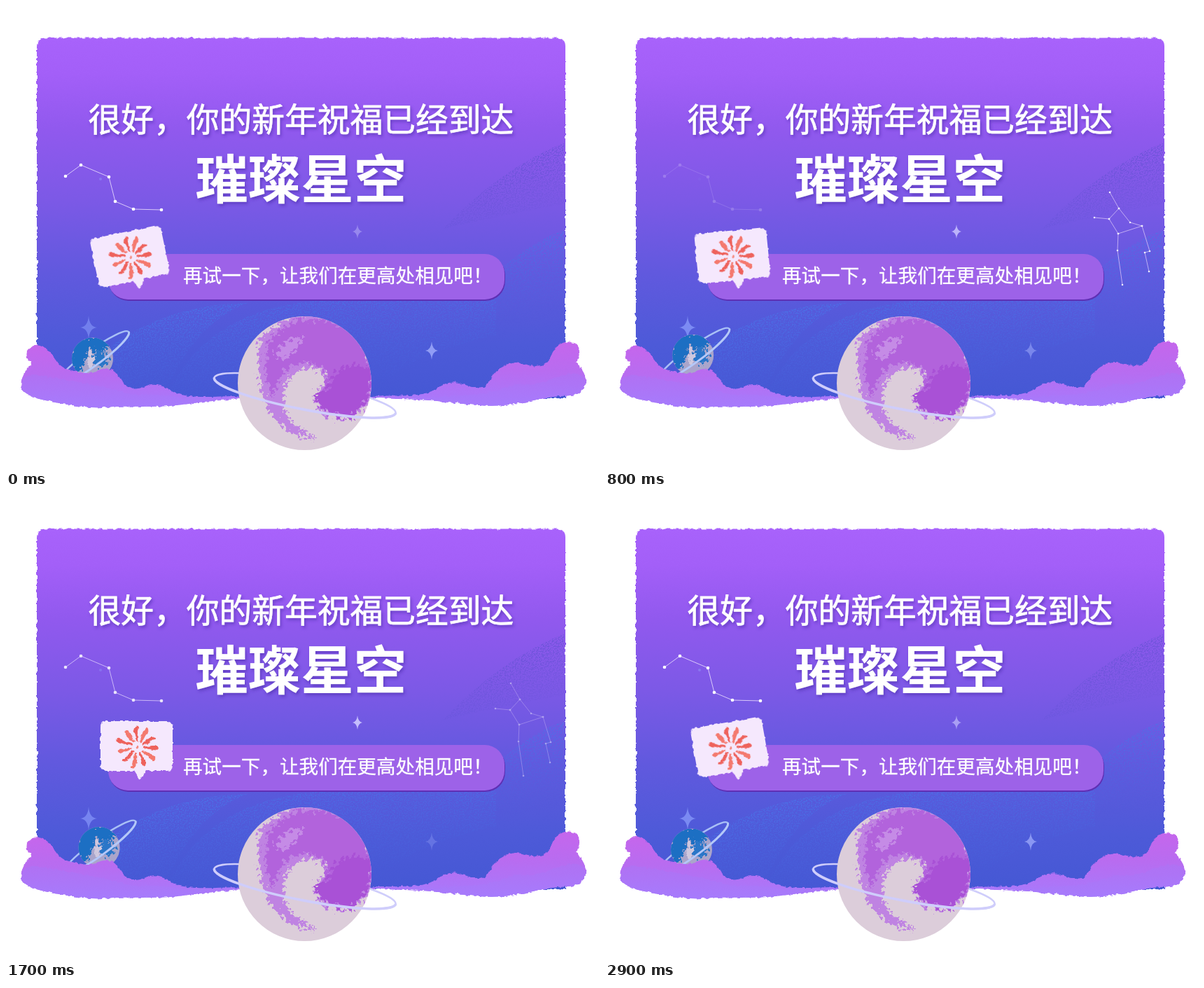
Animation, 847 px wide and 661 px high, one loop 3 s. Source, as an HTML page:

```html
<!DOCTYPE html>
<html lang="zh-CN">
<head>
<meta charset="utf-8">
<style>
html, body { margin: 0; width: 100%; height: 100%; overflow: hidden; background: #fff; }
svg { display: block; width: 100vw; height: 100vh; }
text { font-family: "Noto Sans CJK SC", "Noto Sans CJK JP", "Noto Sans CJK", sans-serif; fill: #fff; }
</style>
</head>
<body>
<svg viewBox="0 0 847 661" xmlns="http://www.w3.org/2000/svg">
  <defs>
    <linearGradient id="sky" x2="0" y2="1">
      <stop offset="0" stop-color="#a862fb"/>
      <stop offset=".1" stop-color="#a35ff8"/>
      <stop offset=".25" stop-color="#9159ee"/>
      <stop offset=".45" stop-color="#7c59e6"/>
      <stop offset=".65" stop-color="#6159de"/>
      <stop offset=".85" stop-color="#4d5ad8"/>
      <stop offset="1" stop-color="#4558d4"/>
    </linearGradient>
    <linearGradient id="cloud" x2="0" y2="1">
      <stop offset="0" stop-color="#c566ec"/>
      <stop offset=".45" stop-color="#b86cf0"/>
      <stop offset="1" stop-color="#a67afc"/>
    </linearGradient>
    <linearGradient id="mist" x2="0" y2="1">
      <stop offset="0" stop-color="#b071f3"/>
      <stop offset="1" stop-color="#a67bfc"/>
    </linearGradient>
    <linearGradient id="bandHigh" x1=".3" y1="0" x2=".7" y2="1">
      <stop offset="0" stop-color="#5a50cc" stop-opacity=".75"/>
      <stop offset="1" stop-color="#5a50cc" stop-opacity="0"/>
    </linearGradient>
    <linearGradient id="bandLow" x1=".35" y1="0" x2=".6" y2="1">
      <stop offset="0" stop-color="#4a76ea" stop-opacity=".85"/>
      <stop offset="1" stop-color="#4a66e0" stop-opacity="0"/>
    </linearGradient>
    <filter id="rough" x="-5%" y="-5%" width="110%" height="110%" color-interpolation-filters="sRGB">
      <feTurbulence type="fractalNoise" baseFrequency=".16" numOctaves="2" seed="4"/>
      <feDisplacementMap in="SourceGraphic" scale="5" xChannelSelector="R" yChannelSelector="G"/>
    </filter>
    <filter id="brush" x="-20%" y="-20%" width="140%" height="140%" color-interpolation-filters="sRGB">
      <feTurbulence type="fractalNoise" baseFrequency=".18" numOctaves="3" seed="9"/>
      <feDisplacementMap in="SourceGraphic" scale="24" xChannelSelector="R" yChannelSelector="G"/>
      <feGaussianBlur stdDeviation=".6"/>
    </filter>
    <filter id="spray" color-interpolation-filters="sRGB">
      <feTurbulence type="fractalNoise" baseFrequency=".55" numOctaves="2" seed="2"/>
      <feColorMatrix values="0 0 0 0 0  0 0 0 0 0  0 0 0 0 0  7 0 0 0 -3.3"/>
      <feComposite in="SourceGraphic" operator="in"/>
    </filter>
    <filter id="shade" x="-5%" y="-20%" width="110%" height="150%">
      <feDropShadow dx="2" dy="3" stdDeviation="2" flood-color="#4a2aa8" flood-opacity=".55"/>
    </filter>
    <clipPath id="cardClip"><rect x="46" y="47" width="751" height="510"/></clipPath>
    <clipPath id="discBig"><circle cx="426.5" cy="538.5" r="95.5"/></clipPath>
    <clipPath id="discSmall"><circle r="29.5"/></clipPath>
  </defs>

  <path d="M44,560V58Q44,45.500 56,45.500H787Q799,45.500 799,58V560Z" fill="url(#sky)" filter="url(#rough)"/>
  <g clip-path="url(#cardClip)">
    <g filter="url(#spray)">
      <path d="M800,194Q705,232 625,318Q720,296 800,282Z" fill="url(#bandHigh)"/>
      <path d="M800,319Q745,338 700,382L640,430Q720,470 800,440Z" fill="url(#bandLow)"/>
      <path d="M228,560Q290,420 480,419Q610,415 700,375L700,470Q560,500 520,560Z" fill="url(#bandLow)"/>
      <path d="M150,485Q235,425 345,424Q265,455 225,560L160,545Z" fill="url(#bandLow)"/>
    </g>
  </g>

  <g id="dipper" stroke="#d9c9fa" fill="none"></g>
  <g id="hunter" stroke="#cbb6f5" fill="none"></g>
  <g id="sparkles"></g>

  <rect x="147" y="356" width="566" height="65" rx="28" fill="#5f2fb4"/>
  <rect x="146" y="354" width="566" height="65" rx="28" fill="#9d62e8"/>

  <g filter="url(#shade)">
    <text x="117.500" y="179.300" font-size="46.750" font-weight="500" stroke="#fff" stroke-width=".7">很好，你的新年祝福已经到达</text>
    <text x="270.500" y="274.500" font-size="75.400" font-weight="700">璀璨星空</text>
  </g>
  <text x="253" y="395" font-size="27.600" font-weight="500" stroke="#fff" stroke-width=".3">再试一下，让我们在更高处相见吧！</text>

  <g id="bubble">
    <path d="M143,320H230Q238,320 238,328V383Q238,391 230,391H200L191,404L183,391H143Q135,391 135,383V328Q135,320 143,320Z" fill="#f5e8fd" filter="url(#rough)"/>
    <g id="burst" transform="translate(188 357)" filter="url(#rough)"></g>
  </g>

  <g id="moonlet">
    <ellipse rx="64" ry="11" transform="rotate(-36)" fill="none" stroke="#a9c0f6" stroke-width="2.500"/>
    <circle r="29.500" fill="#aaa5cb"/>
    <g clip-path="url(#discSmall)">
      <g filter="url(#brush)">
        <path d="M-32,-4Q-28,-34 4,-32Q24,-28 22,-16Q10,-6 8,-12Q-8,-14 -10,2Q-12,12 -20,20Q-34,14 -32,-4Z" fill="#1c6fc3"/>
        <path d="M0,4Q2,-12 16,-10Q26,-2 18,8Q8,14 0,4Z" fill="#2a76c8"/>
        <path d="M-8,4Q-6,-10 4,-9Q-2,0 4,10Q-4,18 -8,4Z" fill="#cfc8de"/>
      </g>
    </g>
    <path d="M-64,0A64,11 0 0 0 64,0" transform="rotate(-36)" fill="none" stroke="#b4c8f8" stroke-width="3"/>
  </g>

  <g id="cloudL" filter="url(#rough)"></g>
  <g id="cloudR" filter="url(#rough)"></g>

  <ellipse rx="132" ry="20" transform="translate(427 556) rotate(11)" fill="none" stroke="#cfcdfb" stroke-width="2.600"/>
  <circle cx="426.500" cy="538.500" r="95.500" fill="#dccdda"/>
  <g clip-path="url(#discBig)">
    <g filter="url(#brush)">
      <path d="M362,478Q395,436 450,440Q530,460 526,548Q512,596 466,588Q446,584 440,560Q458,540 452,522Q428,510 406,528Q392,552 400,582Q416,606 446,618Q402,616 380,584Q356,548 362,478Z" fill="#bf83e2"/>
      <path d="M374,480Q402,446 448,446Q526,462 524,545Q508,592 468,584Q444,574 442,556Q462,544 456,520Q430,500 402,518Q384,532 382,562Q366,528 374,480Z" fill="#b263dc"/>
      <path d="M440,556Q466,548 470,522Q492,504 524,520Q522,570 490,588Q448,586 440,556Z" fill="#a951d6"/>
      <path d="M384,494Q404,472 426,474Q416,496 390,506Z" fill="#c58be6"/>
    </g>
  </g>
  <g transform="translate(427 556) rotate(11)">
    <path d="M-132,0A132,20 0 0 0 132,0" fill="none" stroke="#cfcdfb" stroke-width="3.600"/>
    <circle id="satellite" r="5.700" fill="#d3d1fb"/>
  </g>
</svg>
<script>
const $ = id => document.getElementById(id);
const NS = 'http://www.w3.org/2000/svg';
const LOOP = 3000, STEP = 100, TAU = Math.PI * 2;

function add(parent, tag, attrs) {
  const el = document.createElementNS(NS, tag);
  for (const k in attrs) el.setAttribute(k, attrs[k]);
  parent.appendChild(el);
  return el;
}

const parse = s => s.split(' ').map(p => p.split(',').map(Number));

// Closed smooth outline: points act as controls, midpoints as joints.
function blob(str) {
  const p = parse(str);
  const mid = (a, b) => [(a[0] + b[0]) / 2, (a[1] + b[1]) / 2];
  let d = 'M' + mid(p[p.length - 1], p[0]);
  p.forEach((q, i) => { d += 'Q' + q + ' ' + mid(q, p[(i + 1) % p.length]); });
  return d + 'Z';
}

function cloud(id, back, front) {
  add($(id), 'path', { d: blob(back), fill: 'url(#cloud)' });
  add($(id), 'path', { d: blob(front), fill: 'url(#mist)' });
}
cloud('cloudL',
  '28,492 42,483 58,488 70,503 80,517 105,523 124,525 137,517 153,519 163,531 170,543 186,548 205,540 225,542 242,554 275,559 335,556 335,561 290,564 240,571 200,572 160,571 130,574 100,571 70,566 38,559 22,550 21,536 27,520 38,511 29,504',
  '22,536 34,524 60,530 90,534 120,540 150,546 180,556 215,554 250,559 300,560 240,571 200,572 160,571 130,574 100,571 70,566 38,559 22,550');
cloud('cloudR',
  '520,556 570,557 605,553 624,540 643,536 661,543 681,547 692,534 705,514 730,508 754,515 775,511 782,489 799,478 817,482 820,497 814,509 827,524 829,541 817,556 780,557 745,565 700,572 650,568 600,562 520,560',
  '560,559 610,559 650,556 690,553 725,540 760,540 790,528 815,523 828,532 828,542 817,556 780,557 745,565 700,572 650,568 600,562');

function stars(id, lines, r) {
  for (const line of lines) {
    add($(id), 'polyline', { points: line, 'stroke-width': 1 });
    for (const [cx, cy] of parse(line)) add($(id), 'circle', { cx, cy, r, fill: '#fff', stroke: 'none' });
  }
}
stars('dipper', ['85,243 107,227 147,244 156,279 182,290 222,291'], 2.3);
add($('dipper'), 'circle', { cx: 135, cy: 247, r: 2, fill: '#8f8cf5', stroke: 'none', opacity: .6 });
stars('hunter', [
  '721,266 734,289 750,309 767,314 733,325 720,304 734,289',
  '699,302 720,304',
  '733,325 732,349 739,398',
  '767,314 778,350 771,352 777,379'
], 1.3);

const PETALS = 11;
for (let i = 0; i < PETALS; i++) {
  const len = 1 + .06 * Math.sin(i * 2.4);
  add($('burst'), 'path', {
    d: 'M8,-1Q17,-5 26,-5.5Q32,-3 28.500,1Q19,0 8,1.500Z',
    fill: i % 2 ? '#f4796e' : '#ee625c',
    transform: `rotate(${i * 360 / PETALS + 8}) scale(${len})`
  });
}
add($('burst'), 'circle', { r: 2.4, fill: '#f58a80' });

const sparkles = [
  { x: 502, y: 322, w: 7, h: 10, fill: '#cdc9ff', mean: .58, amp: .33, shift: .17 },
  { x: 608, y: 492, w: 9, h: 13, fill: '#a9b4ff', mean: .38, amp: .36, shift: .5 },
  { x: 118, y: 459, w: 12, h: 17, fill: '#8fa2ff', mean: .36, amp: .34, shift: .33 }
].map(s => ({ ...s, el: add($('sparkles'), 'path', {
  d: `M0,${-s.h}Q1,-1 ${s.w},0Q1,1 0,${s.h}Q-1,1 ${-s.w},0Q-1,-1 0,${-s.h}Z`,
  transform: `translate(${s.x} ${s.y})`, fill: s.fill
}) }));

const clamp = v => Math.max(0, Math.min(1, v));
const ramp = (t, a, b) => clamp((t - a) / (b - a));

// time, x offset, y offset
const drift = [[0, 0, 0], [600, 0, -3.5], [1100, 5.5, -6], [1650, 10, -3], [2100, 6, 1], [2400, 3, 1.5], [2900, 0, 0], [3000, 0, 0]];
function driftAt(t) {
  const i = drift.findIndex(k => k[0] > t);
  const a = drift[i - 1], b = drift[i], u = ramp(t, a[0], b[0]);
  return [a[1] + (b[1] - a[1]) * u, a[2] + (b[2] - a[2]) * u];
}

const squash = (id, y, s) => $(id).setAttribute('transform', `translate(0 ${y * (1 - s)}) scale(1 ${s})`);

function draw(t) {
  const p = t / 1000, wave = Math.cos(TAU * p);
  $('bubble').setAttribute('transform', `rotate(${-2.8 - 9 * wave} 191 403)`);

  $('dipper').setAttribute('opacity', 1 - ramp(t, 0, 1000) + ramp(t, 1200, 1800));
  $('hunter').setAttribute('opacity', ramp(t, 0, 900) - ramp(t, 1300, 2000));
  for (const s of sparkles)
    s.el.setAttribute('opacity', clamp(s.mean - s.amp * Math.cos(TAU * (p - s.shift))));

  const [dx, dy] = driftAt(t);
  $('moonlet').setAttribute('transform', `translate(${123.5 + dx} ${503 + dy})`);

  squash('cloudL', 573, 1 - .012 * (1 - wave));
  squash('cloudR', 572, 1 + .017 * (1 - wave));

  const a = Math.PI * (1 - ramp(t, 2200, 2740));
  const sat = $('satellite');
  sat.setAttribute('cx', 132 * Math.cos(a));
  sat.setAttribute('cy', 20 * Math.sin(a));
  sat.setAttribute('opacity', t > 2200 && t < 2740 ? 1 : 0);
}

let shown = -1;
function tick(now) {
  const t = Math.floor((now % LOOP) / STEP) * STEP;
  if (t !== shown) draw(shown = t);
  requestAnimationFrame(tick);
}
draw(0);
requestAnimationFrame(tick);
</script>
</body>
</html>
```
